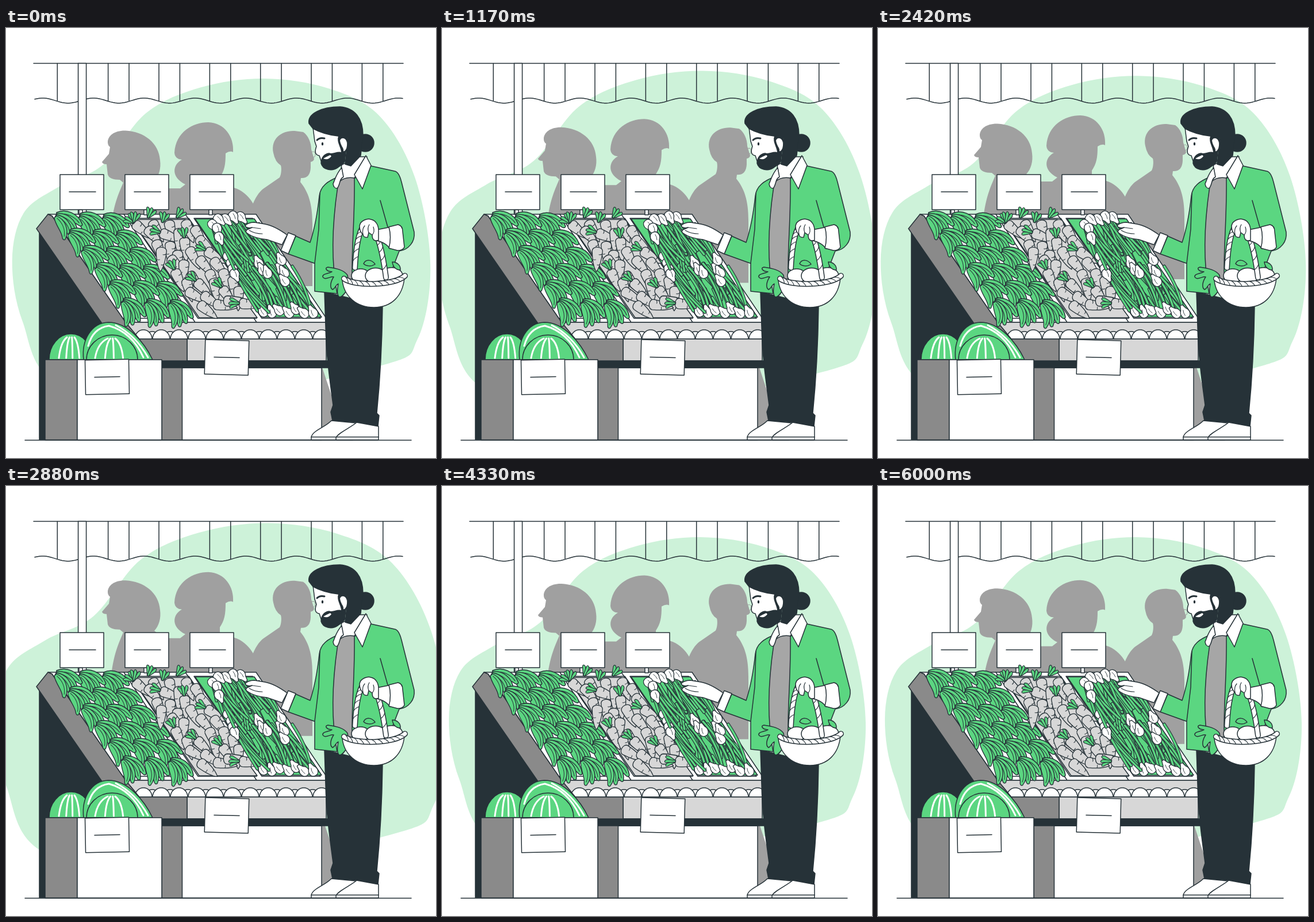
Animation of 748 by 748 pixels, one loop 6040 ms. Source, as an HTML page with a canvas:

```html
<!DOCTYPE html>
<html lang="en">
<head>
<meta charset="utf-8">
<title>Vegetable market</title>
<style>
html, body { margin: 0; width: 100%; height: 100%; overflow: hidden; background: #fff; }
canvas { display: block; width: 748px; height: 748px; }
</style>
</head>
<body>
<canvas id="stage"></canvas>
<script>
const SIZE = 748, LOOP = 6040, TAU = Math.PI * 2;
const DARK = '#263238', GREEN = '#5bd681', PALE = '#cdf2d9', SHADE = '#a0a0a0';
const SHIRT = '#a6a6a6', MID = '#8a8a8a', LIGHT = '#d7d7d7', WHITE = '#fff';
const dpr = window.devicePixelRatio || 1;

function setup(canvas) {
  canvas.width = canvas.height = SIZE * dpr;
  const ctx = canvas.getContext('2d');
  ctx.scale(dpr, dpr);
  ctx.lineJoin = ctx.lineCap = 'round';
  return ctx;
}
const view = setup(document.getElementById('stage'));
const layer = document.createElement('canvas');
const g = setup(layer);

function shape(d, fill, stroke = DARK, width = 1.5) {
  const p = new Path2D(d);
  if (fill) { g.fillStyle = fill; g.fill(p); }
  if (stroke) { g.strokeStyle = stroke; g.lineWidth = width; g.stroke(p); }
}
const line = (d, width, color) => shape(d, null, color, width);
const rect = (x, y, w, h, fill) => shape(`M${x} ${y}h${w}v${h}h${-w}Z`, fill);
const oval = (x, y, rx, ry, fill) =>
  shape(`M${x - rx} ${y}a${rx} ${ry} 0 0 1 ${2 * rx} 0a${rx} ${ry} 0 0 1 ${-2 * rx} 0Z`, fill);
const dome = (x, y, rx, ry, fill) => shape(`M${x - rx} ${y}a${rx} ${ry} 0 0 1 ${2 * rx} 0Z`, fill);

function at(x, y, deg, draw, scale = 1) {
  g.save();
  g.translate(x, y);
  g.rotate(deg * TAU / 360);
  g.scale(scale, scale);
  draw();
  g.restore();
}
let seed = 7;
const rand = () => (seed = seed * 16807 % 2147483647) / 2147483647;
const jitter = n => (rand() * 2 - 1) * n;

// Smooth closed curve through a few points.
function loopThrough(pts) {
  const p = new Path2D(), n = pts.length, pick = i => pts[(i + n) % n];
  p.moveTo(...pts[0]);
  for (let i = 0; i < n; i++) {
    const [a, b, c, d] = [-1, 0, 1, 2].map(k => pick(i + k));
    p.bezierCurveTo(b[0] + (c[0] - a[0]) / 6, b[1] + (c[1] - a[1]) / 6,
      c[0] - (d[0] - b[0]) / 6, c[1] - (d[1] - b[1]) / 6, c[0], c[1]);
  }
  return p;
}

// ---- stall ----
function awning() {
  const step = 88.35;
  line('M48 61.5H691');
  for (let k = 0; k < 7; k++) line(`M${89.3 + k * step} 61.5v65m36.4 0v-65`);
  let d = '';
  for (let x = 50; x <= 690; x += 4) {
    d += (d ? 'L' : 'M') + x + ' ' + (126.3 - 4.4 * Math.cos((x - 63.7) / step * TAU));
  }
  line(d);
  rect(125.6, 61.5, 14, 264, WHITE);
}

function stall() {
  shape('M58 350V716H306V578L208 514Z', DARK);
  rect(306, 591, 243, 125.5, WHITE);
  rect(271, 589, 35.5, 127.5, MID);
  shape('M73 324H435L556 503V512H208L80 327Z', WHITE);
  for (const x of [84, 216, 327]) line(`M${x} 331h102l118 174h-102Z`);
  for (const x of [205, 312]) line(`M${x} 324l124 188`);
  shape('M208 512H557V541H232Z', LIGHT);
  for (let x = 239; x < 550; x += 31) {
    dome(x + 15.5, 541, 13, 13, WHITE);
    dome(x, 541, 15, 16, WHITE);
  }
  rect(315, 541, 242, 38, LIGHT);
  rect(271, 579, 289, 12, DARK);
  shape('M53 349L73 324L80 327L208 512L232 541H315V579H212Z', MID);
}

function signs() {
  for (let i = 0; i < 3; i++) {
    const x = 94 + i * 113;
    rect(x + 33, 316, 6, 9, WHITE);
    rect(x, 255, 76, 61, WHITE);
    line(`M${x + 16} 285h46`);
  }
}

function card(x, y, deg) {
  at(x, y, deg, () => {
    rect(-38, -30, 76, 60, WHITE);
    line('M-22 0h44');
  });
}

// ---- produce ----
function bananas() {
  for (let row = 0; row < 6; row++) {
    for (let col = 2; col >= 0; col--) {
      const x = 88 + row * 23.4 + col * 41, y = 321 + row * 29.8 + col * 1.5;
      const tilt = row === 5 ? 20 : 7;
      for (let i = 0; i < 4; i++) {
        at(x, y + i * 2, tilt + i * 15, () => {
          shape('M0 0C15 -9 37 -4 47 15C47 19 43 19 40 17C30 11 14 13 0 6Z', GREEN);
          line('M4 2C18 -1 32 3 41 13', 1.1);
        }, 1 - i * .04);
      }
    }
  }
}

function tuft(x, y, deg) {
  for (const t of [-27, 24, -3]) {
    at(x, y, deg + t, () => shape('M0 -1.5L16 -3.5Q20 -3 18 0L15 2L0 1.5Z', GREEN, DARK, 1.2));
  }
}
function carrot(x, y, deg, leafy) {
  at(x, y, deg, () => {
    shape('M0 -9C-9 -9 -9 9 0 9C16 8 29 5 36 0C29 -5 16 -8 0 -9Z', LIGHT, DARK, 1.3);
    line('M5 -8q2 3 1 5M15 7q1 -3 0 -5M23 -5q2 2 1 4', 1);
    if (leafy) tuft(-6, 0, 180);
  });
}
function carrots() {
  shape('M218 333H312L437 504H336Z', LIGHT);
  for (let row = 0; row < 9; row++) {
    for (let col = 0; col < 4; col++) {
      const x = 232 + row * 13 + col * 27, y = 338 + row * 17.5;
      carrot(x + jitter(5), y + jitter(6), row > 7 ? 20 + jitter(25) : 58 + jitter(40), (row * 3 + col * 2) % 5 === 0);
    }
  }
  for (let i = 0; i < 4; i++) tuft(222 + i * 25, 338 - i % 2 * 8, -60 - jitter(25));
}

function stalk(x, y, dx, dy) {
  const d = `M${x} ${y}q${dx * .35 + 4} ${dy * .5} ${dx} ${dy}`;
  line(d, 5.8, DARK);
  line(d, 3.4, GREEN);
}
// A few bulbs spread along (sx, sy) with stalks running to (dx, dy).
function bunch(x, y, count, sx, sy, dx, dy) {
  const spots = Array.from({ length: count }, (_, i) => [x + i * sx + jitter(2), y + i * sy + jitter(4)]);
  for (const [px, py] of spots) {
    for (let i = 0; i < 2; i++) stalk(px + dx * .08, py + dy * .08, dx + jitter(14), dy + jitter(9));
  }
  const turn = Math.atan2(dy, dx) * 360 / TAU;
  for (const [px, py] of spots) {
    at(px, py, turn + jitter(15), () => {
      shape('M-10 0C-10 -9 1 -10 6 -5L14 -2V2L6 5C1 10 -10 9 -10 0Z', WHITE, DARK, 1.3);
      line('M-5 -2Q0 -3 5 -1', .8);
    });
  }
}
function onions() {
  const bed = 'M329 332H432L549 503H446Z';
  shape(bed, GREEN);
  g.save();
  g.clip(new Path2D(bed));
  for (let i = 0; i < 40; i++) {
    const v = rand();
    stalk(340 + rand() * 85 + v * 95, 330 + v * 140, 26 + jitter(20), 44 + jitter(12));
  }
  g.restore();
  bunch(446, 490, 7, 14.5, .5, -43, -68);
  bunch(477, 406, 4, 3, 11, -38, -62);
  bunch(388, 397, 4, 4, 10, 44, 55);
  bunch(441, 412, 3, 6, 5, -34, -62);
  bunch(408, 329, 4, -13, 0, 38, 58);
  bunch(362, 340, 3, 4, 13, 36, 56);
}

function ribs(x, top, w, base) {
  for (const k of [-1, -.42, .08, .62]) {
    const foot = x + k * w;
    line(`M${x + k * 8} ${top + 6}Q${foot + (x - foot) * .15} ${top + 14} ${foot} ${base - 3}`, 3, WHITE);
  }
}
function melons() {
  dome(113, 577, 38, 45, GREEN);
  ribs(114, 532, 22, 577);
  shape('M135 577C131 543 148 513 178 512C213 512 241 548 255 577Z', GREEN);
  line('M143 553Q151 522 179 518Q219 529 239 573M191 517Q226 535 247 573', 3, WHITE);
  dome(184.5, 577, 44.5, 43, GREEN);
  ribs(185, 534, 30, 577);
}
function crates() {
  rect(68, 577, 56, 139.5, MID);
  rect(124, 577, 147, 139.5, WHITE);
  card(176, 607, -1);
  card(384, 573, 1.5);
}

// ---- customer ----
function clothes() {
  shape('M554 459L655 484C654 560 650 620 645 670L649 674L647 693L615 686L568 683L565 668L569 656C563 610 557 570 556 520Z', DARK);
  shape('M531 712C533 700 555 695 566 683L608 687L603 716.5H531Z', WHITE);
  shape('M574 713C576 705 600 695 610 686L648 693V716.5H574Z', WHITE);
  line('M531 711.5H573M574 711.5H648');
  shape('M578 266Q593 253 608 261L609 440H566Q566 340 578 266Z', SHIRT);
  shape('M578 259C560 266 547 275 545 292C541 330 536 352 529 373L504 362L491 393L537 409.5V458L576 462C564 400 569 330 577 276Z', GREEN);
  line('M546 288L544 350L537 409');
  shape('M606 262L635 240L676 249C683 250 686 260 688 268L710 355C712 372 700 386 684 388L664 440H602C601 380 607 330 606 262Z', GREEN);
  line('M651 300L664 346');
}
function reach() {
  shape('M489 360C478 352 462 343 450 341L432 338C424 338 417 341 416 345Q420 349 428 347L419 351Q415 355 421 358C431 365 445 367 454 368L480 377Z', WHITE);
  line('M428 347L443 349M423 352Q433 358 446 358', 1.2);
  shape('M491 356L504 361L491 393L478 387Z', WHITE);
}
function head() {
  shape('M584 238L612 224H628L606 261Q590 258 579 268Z', WHITE);
  oval(625, 200, 15, 15, DARK);
  shape('M534 173L537 197L540 206C537 214 537 221 545 222L549 234C557 248 580 246 588 233L589 187Z', WHITE);
  shape('M579 187C575 199 583 205 584 217C575 214 570 221 562 218C553 219 549 225 548 235C551 247 567 250 577 243L589 233L594 190Z', DARK);
  shape('M527 166C524 149 549 137 581 137C607 139 621 157 621 187L617 222L600 240L590 237L595 191Q587 186 578 188Q552 185 534 175Z', DARK);
  shape('M581 196C583 189 592 191 593 200C594 209 589 216 587 214C588 208 583 207 581 196Z', WHITE, null);
  shape('M552 227Q560 231 566 223L564 221Q557 224 552 227Z', WHITE, null);
  oval(550.5, 201.5, 1, 2, DARK);
  line('M541 195Q546 190 554 192', 3);
  shape('M584 243C574 254 573 262 569 271Q570 279 576 279C582 272 579 263 587 259Z', WHITE);
  shape('M626 222L635 239L620 280L606 255Z', WHITE);
}

// Twisted rope along a cubic given by four points.
function rope(a, b, c, d, count) {
  const path = `M${a}C${b} ${c} ${d}`;
  line(path, 10, DARK);
  line(path, 7, WHITE);
  const mix = (t, i) => (1 - t) ** 3 * a[i] + 3 * t * (1 - t) ** 2 * b[i] + 3 * t * t * (1 - t) * c[i] + t ** 3 * d[i];
  for (let i = 1; i < count; i++) {
    const t = i / count, x = mix(t, 0), y = mix(t, 1);
    const turn = Math.atan2(mix(t + .01, 1) - y, mix(t + .01, 0) - x);
    at(x, y, turn * 360 / TAU, () => line('M-4 -4Q1 -2 4 4', 1.1));
  }
}
function basket() {
  shape('M594 430C588 421 575 418 560 416C554 417 556 423 567 424C560 428 550 427 551 433C555 440 565 431 570 433C564 442 563 452 568 455C572 454 573 447 578 445C576 455 575 464 580 468C588 468 591 455 598 451Z', GREEN);
  for (const [x, r] of [[617, 16], [671, 19], [643, 18]]) oval(x, 431, r, r * .75, WHITE);
  shape('M622 410C626 402 636 402 642 411C636 415 627 415 622 410Z', GREEN);
  shape('M672 407C680 407 687 413 686 421C678 421 673 415 672 407Z', GREEN);
  shape('M585 439C588 467 610 486 640 486C671 486 690 466 693 435Q640 456 585 439Z', WHITE);
  rope([588, 436], [605, 449], [675, 449], [694, 431], 12);
  rope([607, 417], [612, 312], [645, 312], [661, 434], 19);
}
function grip() {
  shape('M640 352L670 346L668 384Q660 372 640 369Z', WHITE);
  shape('M666 346L682 342Q690 344 690 354L693 381Q691 387 681 387L666 383Q671 364 666 346Z', WHITE);
  shape('M615 344C617 334 629 331 635 333C644 335 649 344 648 356V369C640 372 637 367 637 360L631 356L629 364Q622 365 621 359Q615 355 615 344Z', WHITE);
  line('M621 359Q619 350 624 344M631 356Q628 348 632 342M637 360Q642 355 639 346', 1.2);
}

for (const draw of [awning, stall, signs, bananas, carrots, onions, melons, crates,
  clothes, reach, head, basket, grip]) draw();
line('M33 717H705');

// ---- moving background ----
const blob = loopThrough([
  [450, 89], [560, 106], [648, 153], [710, 260], [737, 412], [715, 540], [650, 587], [320, 650],
  [92, 617], [30, 510], [12, 405], [32, 322], [92, 277], [170, 238], [245, 148], [340, 104]
]);
const crowd = [
  'M208 178.5C189 178 177 187 177 199Q177 204 181 207L179 219L167 233Q168 237 175 237L177 255Q180 264 198 264L204 269C195 290 187 308 183 345H300V300L258 266C266 258 270 244 268 230C266 200 240 180 208 178.5Z',
  'M293 217C295 181 325 164 352 164C381 165 397 190 395 216Q390 213 382 218C382 238 380 248 372 260V278H397C425 287 435 312 448 345H270V279H303L312 272C287 260 289 238 306 229Q294 228 293 217Z',
  'M465 217C460 192 480 178 502 179L517 181C526 187 531 200 531 211L536 228Q535 232 530 233V243Q529 262 513 261L512 268C526 285 533 306 533 340V449H470L420 330C430 303 436 289 447 280L476 260C480 252 479 241 478 239Q468 233 465 217Z',
  'M540 560L575 666L566 740H540Z'
].map(d => new Path2D(d));

const beats = [[0, 1], [600, 1.1], [1800, 1], [2300, 1], [3000, 1.1], [3600, 1], [LOOP + 100, 1]];
function beat(t) {
  const i = beats.findIndex(b => b[0] > t);
  const [t0, a] = beats[i - 1], [t1, b] = beats[i];
  return a + (b - a) * (t - t0) / (t1 - t0);
}

function frame(now) {
  const t = now % LOOP, s = beat(t + 20);
  const rise = 15 * (1 - Math.abs(1 - 2 * t / LOOP));
  view.fillStyle = WHITE;
  view.fillRect(0, 0, SIZE, SIZE);

  view.save();
  view.translate(374, 374);
  view.scale(s, s);
  view.translate(-374, -374);
  view.fillStyle = PALE;
  view.fill(blob);
  view.restore();

  view.save();
  view.beginPath();
  view.rect(0, 0, SIZE, 717);
  view.clip();
  view.translate(0, -rise);
  view.fillStyle = SHADE;
  for (const p of crowd) view.fill(p);
  view.strokeStyle = SHADE;
  view.lineWidth = 1.2;
  view.beginPath();
  view.ellipse(534, 220, 4, 5, 0, 0, TAU);
  view.stroke();
  view.restore();

  view.drawImage(layer, 0, 0, SIZE, SIZE);
  requestAnimationFrame(frame);
}
frame(0);
</script>
</body>
</html>
```
